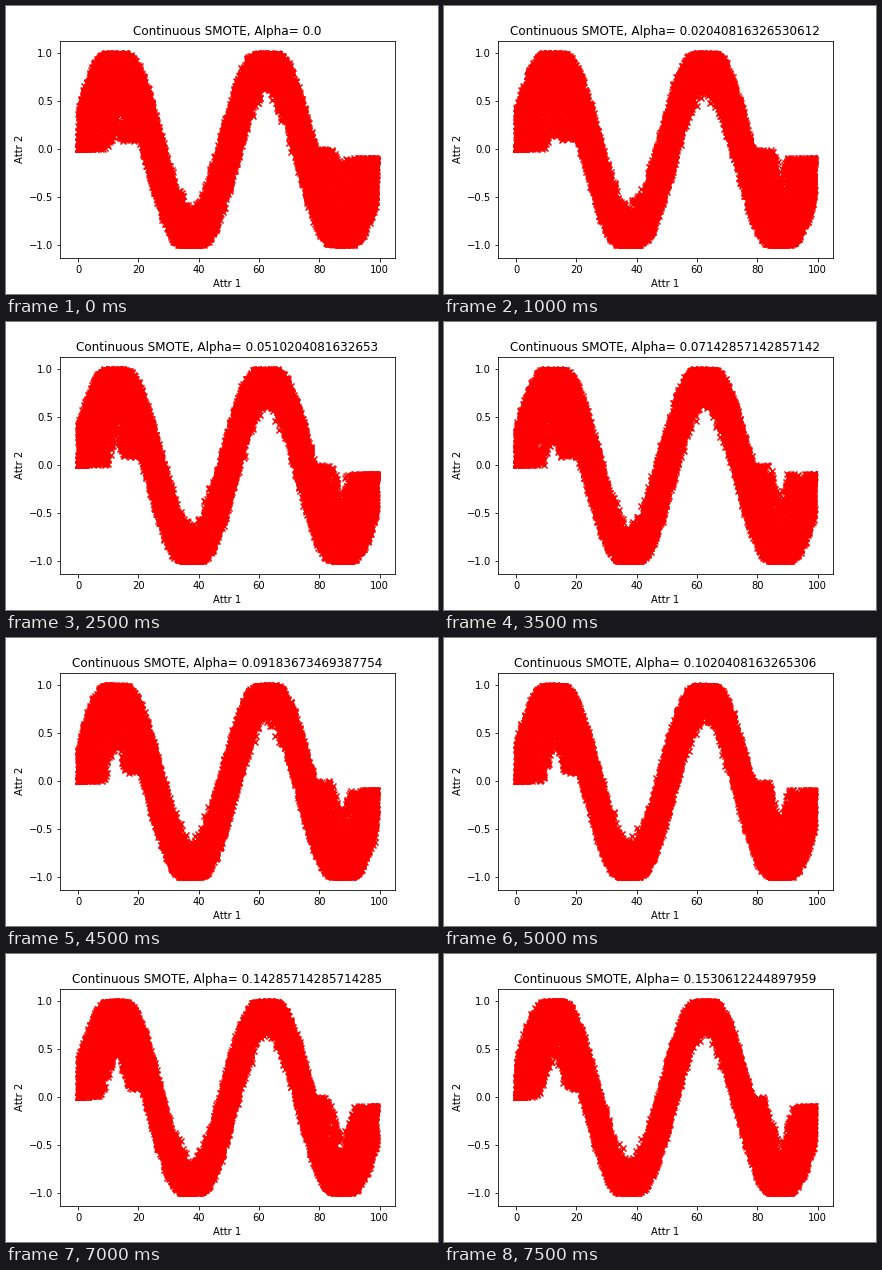
Recreate the animation shown at these times as a matplotlib script. Size 432 px wide and 288 px high, loop 8 s.

```python
import numpy as np
import matplotlib.pyplot as plt
from matplotlib.animation import FuncAnimation

FRAMES, INTERVAL = 16, 500
X_MAX = 99
ALPHAS = np.linspace(0, 0.5, 50)


def wave(x):
    return np.sin(2 * np.pi * x / 50)


def band(rng, reach, shift, n=14000):
    """Points on chords between neighbours, pushed sideways."""
    a = rng.uniform(0, X_MAX, n)
    b = np.clip(a + rng.uniform(-reach, reach, n), 0, X_MAX)
    w = rng.random(n)
    x = a + w * (b - a) + rng.uniform(-shift, shift, n) + rng.normal(0, 0.2, n)
    y = wave(a) + w * (wave(b) - wave(a))
    return np.column_stack([x, y])


def corner(rng, start, side, reach, n=800):
    """Fill between the curve and the level of an end point."""
    dist = rng.uniform(0, 12.5, n)
    x = start + side * dist
    level = wave(start)
    y = level + rng.random(n) * (wave(x) - level)
    limit = reach + 10 * np.abs(y - level) + rng.normal(0, 0.3, n)
    return np.column_stack([x, y])[dist < limit]


def samples(i):
    rng = np.random.default_rng(100 + i)
    alpha = ALPHAS[i]
    parts = [band(rng, 14.6 - 8 * alpha, 3.7 - 4 * alpha)]
    for start, side in ((0, 1), (24.3, -1), (75, 1), (99.3, -1)):
        reach = 10.6 - 20 * alpha + rng.uniform(-0.5, 0.5)
        parts.append(corner(rng, start, side, reach))
    xy = np.vstack(parts)
    return xy[(xy[:, 0] >= 0) & (xy[:, 0] <= X_MAX)]


plt.rcParams["font.family"] = "DejaVu Sans"
plt.rcParams["text.kerning_factor"] = 6
fig, ax = plt.subplots(figsize=(6, 4), dpi=72)
fig.subplots_adjust(left=0.125, right=0.9, bottom=0.125, top=0.88)

points = ax.scatter([], [], marker="x", color="red")
title = ax.set_title("")
ax.set(xlabel="Attr 1", ylabel="Attr 2",
       xlim=(-6.02, 105.02), ylim=(-1.1334, 1.1334),
       xticks=range(0, 101, 20), yticks=np.linspace(-1, 1, 5))


def update(i):
    points.set_offsets(samples(i))
    title.set_text(f"Continuous SMOTE, Alpha= {float(ALPHAS[i])}")
    return points, title


anim = FuncAnimation(fig, update, frames=FRAMES, interval=INTERVAL,
                     repeat=True, repeat_delay=0)
plt.show()
```
